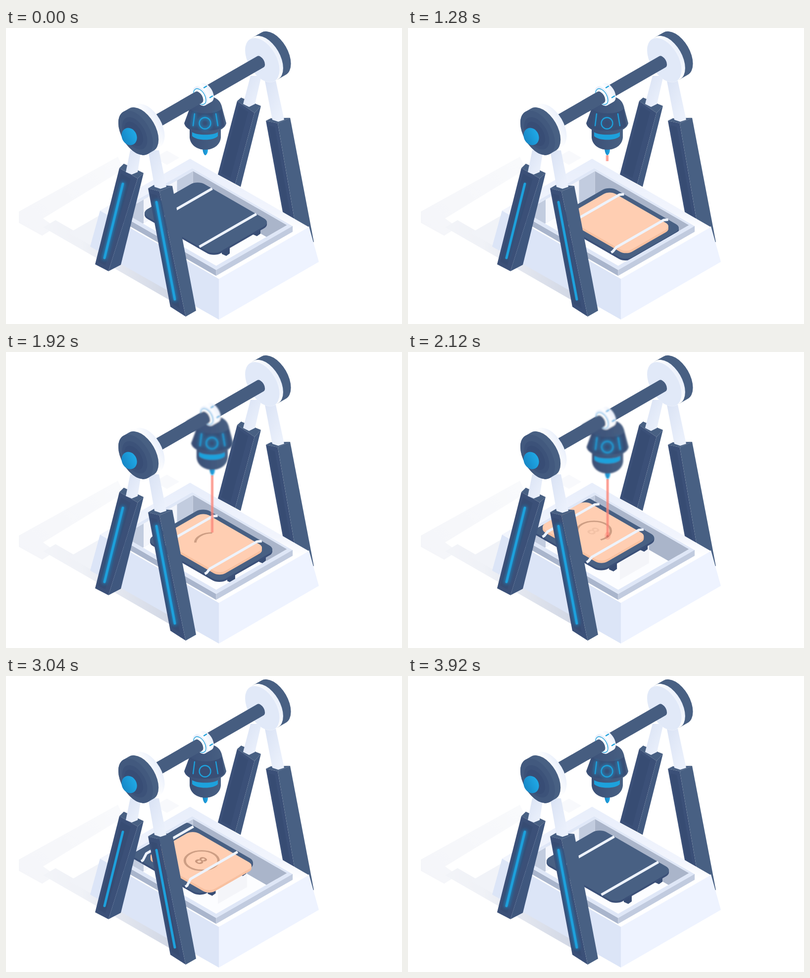
An HTML page that plays this animation: 800 px wide and 600 px high, repeating every 3.96 s.

```html
<!DOCTYPE html>
<html lang="en">
<head>
<meta charset="utf-8">
<title>Laser engraver</title>
<style>
html, body { margin: 0; width: 100%; height: 100%; overflow: hidden; background: #fff; }
svg { display: block; width: 800px; height: 600px; }
</style>
</head>
<body>
<svg viewBox="0 0 800 600" xmlns="http://www.w3.org/2000/svg">
<defs>
  <linearGradient id="shade" gradientUnits="userSpaceOnUse" x1="25" y1="380" x2="340" y2="380">
    <stop offset="0" stop-color="#f4f5f9"/><stop offset=".4" stop-color="#f0f2f7"/><stop offset="1" stop-color="#d0d6e4"/>
  </linearGradient>
  <linearGradient id="far" x1="0" y1="1" x2="1" y2="0">
    <stop offset="0" stop-color="#f4f5f9"/><stop offset="1" stop-color="#f9fafc"/>
  </linearGradient>
  <linearGradient id="rim" x1="0" y1="0" x2="0" y2="1">
    <stop offset="0" stop-color="#e8eefb"/><stop offset=".45" stop-color="#f2f5fd"/><stop offset=".6" stop-color="#fff"/>
  </linearGradient>
  <linearGradient id="pale" x1="0" y1="0" x2="1" y2="1">
    <stop offset="0" stop-color="#d9e2f4"/><stop offset="1" stop-color="#eef3fd"/>
  </linearGradient>
  <linearGradient id="cyan" x1="0" y1="0" x2="1" y2="0">
    <stop offset="0" stop-color="#1787c6"/><stop offset="1" stop-color="#20a9e6"/>
  </linearGradient>
  <linearGradient id="hull" x1="0" y1="0" x2="1" y2="0">
    <stop offset="0" stop-color="#3b5077"/><stop offset="1" stop-color="#486083"/>
  </linearGradient>
  <linearGradient id="white" x1="0" y1="0" x2="1" y2="0">
    <stop offset="0" stop-color="#e4ebf9"/><stop offset=".6" stop-color="#fff"/><stop offset="1" stop-color="#e9effb"/>
  </linearGradient>
  <filter id="soft" filterUnits="userSpaceOnUse" x="0" y="0" width="800" height="600"><feGaussianBlur stdDeviation="3.5"/></filter>
  <filter id="haze" filterUnits="userSpaceOnUse" x="250" y="60" width="330" height="360"><feGaussianBlur id="hazeAmount" stdDeviation="0"/></filter>
  <clipPath id="hole"><path id="holeEdge"/></clipPath>
</defs>
<g id="back"></g>
<g clip-path="url(#hole)"><g id="tray" class="bed"></g></g>
<g id="load" class="bed"></g>
<g id="front"></g>
<g id="head"></g>
<g id="wheel"></g>
</svg>
<script>
const $ = id => document.getElementById(id);
const SLATE = '#486083', NAVY = '#3b5078', BLUE = '#1da1dc';
const CX = .866, CY = .5;

const poly = (points, fill) => `<polygon points="${points}" fill="${fill}"/>`;
const path = (d, fill) => `<path d="${d}" fill="${fill}"/>`;
const line = (x1, y1, x2, y2, color, w) =>
  `<path d="M${x1} ${y1}L${x2} ${y2}" stroke="${color}" stroke-width="${w}" stroke-linecap="round"/>`;
const mix = (a, b, k) => a.map((n, i) => n + (b[i] - n) * k);

// Isometric plane: u runs down-right, v runs up-right, h is height
const iso = (x, y, u, v, h = 0) => [x + CX * (u + v), y + CY * (u - v) - h];
const quad = (x, y, u, v) => `M${x} ${y}L${iso(x, y, u, 0)} ${iso(x, y, u, v)} ${iso(x, y, 0, v)}Z`;
const wall = (x, y, u, v, drop) => `M${x} ${y}L${iso(x, y, u, v)}v${drop}L${x} ${y + drop}Z`;
const slab = (x, y, w, h, r, fill) =>
  `<rect transform="matrix(${CX} ${CY} ${CX} ${-CY} ${x} ${y})" width="${w}" height="${h}" rx="${r}" fill="${fill}"/>`;
function stack(x, y, w, h, r, depth, side, top) {
  let s = '';
  for (let i = depth; i > 0; i--) s += slab(x, y + i, w, h, r, side);
  return s + slab(x, y, w, h, r, top);
}

// Cylinder and disc facing along the bar
const drum = (x, y, a, len, fill) => {
  const b = a * .577;
  return `<path transform="translate(${x} ${y}) rotate(-30)" fill="${fill}"
    d="M0 ${-a}H${len}A${b} ${a} 0 0 1 ${len} ${a}H0A${b} ${a} 0 0 1 0 ${-a}Z"/>`;
};
const disc = (x, y, a, fill, extra = '') =>
  `<ellipse transform="translate(${x} ${y}) rotate(-30)" rx="${a * .577}" ry="${a}" fill="${fill}" ${extra}/>`;

// Leg: left, front, right and back corners of the top; left, front and right of the foot
function leg([l, f, r, b], [L, F, R], side) {
  const at = (k, j) => mix(mix(l, f, k), mix(L, F, k), j);
  return poly([l, f, r, b], SLATE) + poly([l, f, F, L], NAVY) + poly([f, r, R, F], side) +
    poly([at(.15, .04), at(.68, .04), at(.68, .96), at(.15, .96)], '#374c73');
}
const strut = (x1, x2, y1, y2, tip) =>
  poly([x1 - 11, y1, x1 + 11, y1, x2 + 12, y2, x2, y2 + tip, x2 - 12, y2], 'url(#pale)');
const glowLine = (...p) =>
  `<g class="glow" filter="url(#soft)">${line(...p, '#17a3e6', 8)}</g>${line(...p, BLUE, 5)}`;

const HOLE = quad(235, 372.5, 219, 165);
$('holeEdge').setAttribute('d', HOLE);

$('back').innerHTML =
  poly('26,372 226,261 238,286 75,386 100,404 73,421 26,395', 'url(#far)') +
  path(quad(300, 263, 29, 29), '#f8f9fc') +
  path(quad(75, 404, 306, 29), 'url(#shade)') +
  poly('128,415 192,378 172,441', '#f1f3f8') +
  leg([[467, 148], [502, 172], [515, 158], [475, 141]], [[428, 297], [463, 316], [474, 322]], '#425a80') +
  strut(505, 491, 97, 154, 6) +
  leg([[525, 188], [549, 193], [574, 182], [535, 183]], [[564, 400], [590, 430], [622, 434]], SLATE) +
  strut(533, 550, 102, 186, 4) +
  drum(525, 61, 49.5, 18, SLATE) +
  drum(518, 65, 49.5, 8, 'url(#white)') +
  disc(518, 65, 49, '#e1e9f8') +
  poly('190,370 430,508 430,591 170,443', '#dce5f7') +
  poly('430,508 612,402 632,474 430,591', '#eef3ff') +
  path(quad(190, 370, 277, 210), 'url(#rim)') +
  path(wall(222, 373.5, 234, 0, 12), '#a9b5cc') +
  path(wall(425, 490, 0, 178, 12), '#c1cbdf') +
  path(quad(222, 373.5, 234, 178), '#dfe7f7') +
  path(HOLE, '#fcfdff') +
  '<g clip-path="url(#hole)">' +
  path(wall(235, 372.5, 0, 165, 48), '#c2ccdf') +
  path(wall(278, 347.7, 0, 78, 48), '#f4f6fc') +
  path(wall(378, 290, 219, 0, 48), '#aab5ca') +
  path(wall(428, 462, 0, 68, -36), '#f4f5f9') + '</g>';

const tab = (x, y) => path(`M${x} ${y}l16 -8v14l-7 5l-9 -4Z`, '#384d74');
$('tray').innerHTML = tab(436, 451) + tab(498, 411) + stack(272, 375, 171, 133, 16, 4, NAVY, SLATE);

$('load').innerHTML =
  `<g id="plate">${stack(295, 371.5, 145, 107, 14, 5, '#f8c0a0', '#ffceb2')}
    <circle id="ring" r="27.8" pathLength="360" fill="none" stroke="#cd9e84" stroke-width="4"
      transform="matrix(${CX} ${CY} ${CX} ${-CY} 405.5 380) rotate(225) scale(1 -1)"/>
    <text id="digit" transform="matrix(${CX} ${CY} ${-CX} ${CY} 404.5 380)" y="10" text-anchor="middle" fill="#c8977d"
      font-family="Liberation Sans, Arial, sans-serif" font-weight="bold" font-size="29">8</text></g>
  <g fill="none" stroke="#eef3fc" stroke-width="5.2" stroke-linejoin="round">
    <path id="strapA"/><path id="strapB"/></g>`;

$('front').innerHTML =
  leg([[229, 284], [266, 305], [278, 294], [238, 275]], [[180, 479], [207, 493], [232, 480]], '#3f577e') +
  strut(262, 254, 248, 292, 5) + glowLine(236, 316, 199, 466) +
  leg([[287, 325], [310, 331], [336, 320], [299, 318]], [[332, 565], [363, 585], [384, 573]], SLATE) +
  strut(298, 312, 248, 322, 4) + glowLine(304, 353, 341, 550) +
  drum(300, 192, 13, 247, '#465d80');

const lamps = w => line(381, 174, 378, 198, BLUE, w) + line(424, 174, 428, 198, BLUE, w) +
  `<circle cx="402" cy="193" r="11.5" fill="none" stroke="${BLUE}" stroke-width="${w}"/>`;

$('head').innerHTML =
  `<g id="beam"><path id="ray" stroke="#ff8e80" stroke-width="6" stroke-opacity=".6"/>
    <path id="core" stroke="#f77e70" stroke-width="2.2" stroke-opacity=".6"/>
    <g id="spot"><ellipse cx="402.5" cy="373" rx="6" ry="8" fill="#ff7468" fill-opacity=".55"/>
    <circle cx="402.5" cy="374" r="2.6" fill="#c9574f"/></g></g><g id="tool">` +
  path('M397 245H408C408 255 404 258 402.5 258S398 254 397 245Z', 'url(#cyan)') +
  path('M371 205V222C374 255 431 255 434 222V205Z', 'url(#hull)') +
  path('M376 211C385 218 420 218 428 211V219C420 229 385 229 376 219Z', BLUE) +
  path('M371 163C374 143 388 138 404 138S434 144 437 163L445 193C440 219 365 219 360 193Z', 'url(#hull)') +
  path('M371 164C385 176 423 176 436 164L441 198C428 212 377 212 364 198Z', '#394e75') +
  `<g class="glow" filter="url(#soft)">${lamps(5)}</g>${lamps(2.3)}` +
  drum(392.5, 138, 21.5, 14, 'url(#white)') +
  disc(392.5, 138, 21.5, '#eaf0fb') +
  disc(391.5, 139, 17.5, '#fff', `stroke="${BLUE}" stroke-width="1.3"`) +
  line(400, 121, 405, 118, BLUE, 2.4) + line(412, 141, 417, 138, BLUE, 2.4) +
  drum(359, 158, 13, 35, '#465d80') + '</g>';

$('wheel').innerHTML =
  drum(273, 206, 49.5, 14.5, 'url(#white)') +
  drum(262, 212.5, 49.5, 13, SLATE) +
  [49.5, 36, 27].map((a, i) => disc(262 - 2 * i, 212.5 + i, a, ['#42597e', '#3c5279', '#384d75'][i])).join('') +
  '<ellipse cx="249" cy="220" rx="15" ry="18" transform="rotate(-25 249 220)" fill="url(#cyan)"/>';

const LOOP = 3960, R = 27.8;
const clamp = x => Math.max(0, Math.min(1, x));
const ramp = (t, a, b) => clamp((t - a) / (b - a));
const ease = (t, a, b) => { const x = ramp(t, a, b); return x * x * (3 - 2 * x); };
const angle = t => 225 - 246.8 * ease(t, 1700, 2240);
const rad = t => angle(t) * Math.PI / 180;

// Offsets along the two machine axes; together they trace the ring
function bedAt(t) {
  if (t < 1700) return 22.9 * ease(t, 700, 1180) - 10.2 * ease(t, 1380, 1700);
  return (-R * Math.cos(rad(t)) - 7) * (1 - ease(t, 3400, 3840));
}
function headAt(t) {
  if (t < 1700) return -23.2 * ease(t, 1360, 1700);
  return (R * Math.sin(rad(t)) - 3.5) * (1 - ease(t, 2320, 2640));
}
const slideAt = t => 292 * ramp(t, 815, 40) ** 3 + 269 * Math.max(0, (t - 2803) / 557) ** 3;

// A strap lies flat, rises over the passing plate, and tightens when it is home
function strap(id, u, d) {
  const lift = clamp((u - d) / 10), home = clamp(1 - d / 8);
  const tail = Math.max(1 - lift, home), h = lift * (9.5 - 5 * home);
  const points = [[0, 0], [4, 0], [12, h], [122, h], [122 + 11 * tail, h * (1 - tail)]];
  $(id).setAttribute('d', 'M' + points.map(([v, z]) => iso(272, 375, u, v, z)).join('L'));
}

const shift = (el, u, v) => el.setAttribute('transform', `translate(${iso(0, 0, u, v)})`);
const fade = (id, k) => $(id).setAttribute('opacity', k);
const beds = document.querySelectorAll('.bed'), glows = document.querySelectorAll('.glow');

function draw(t) {
  const slide = slideAt(t);
  beds.forEach(el => shift(el, bedAt(t), 0));
  shift($('plate'), slide, 0);
  shift($('head'), 0, headAt(t));
  fade('plate', ramp(t, 30, 100));
  strap('strapA', 34, slide);
  strap('strapB', 137, slide);

  const drawn = 225 - angle(t) + 114 * ease(t, 2060, 2240);
  $('ring').setAttribute('stroke-dasharray', `${drawn} 400`);
  fade('ring', drawn > 0 ? 1 : 0);
  fade('digit', ease(t, 2080, 2220));

  const blur = Math.abs(headAt(t + 20) - headAt(t - 20)) * .17;
  $('hazeAmount').setAttribute('stdDeviation', blur);
  $('tool').setAttribute('filter', blur > .1 ? 'url(#haze)' : 'none');

  const reach = ramp(t, 1240, 1640);
  for (const id of ['ray', 'core']) $(id).setAttribute('d', `M402.5 258v${116 * reach}`);
  fade('spot', ease(t, 2000, 2240));
  fade('beam', reach > 0 ? 1 - ease(t, 2340, 2480) : 0);

  const pulse = (1 + Math.cos(t / LOOP * 4 * Math.PI)) / 2;
  glows.forEach(el => el.setAttribute('opacity', .7 * pulse));
}

function tick() {
  draw(performance.now() % LOOP);
  requestAnimationFrame(tick);
}
tick();
</script>
</body>
</html>
```
